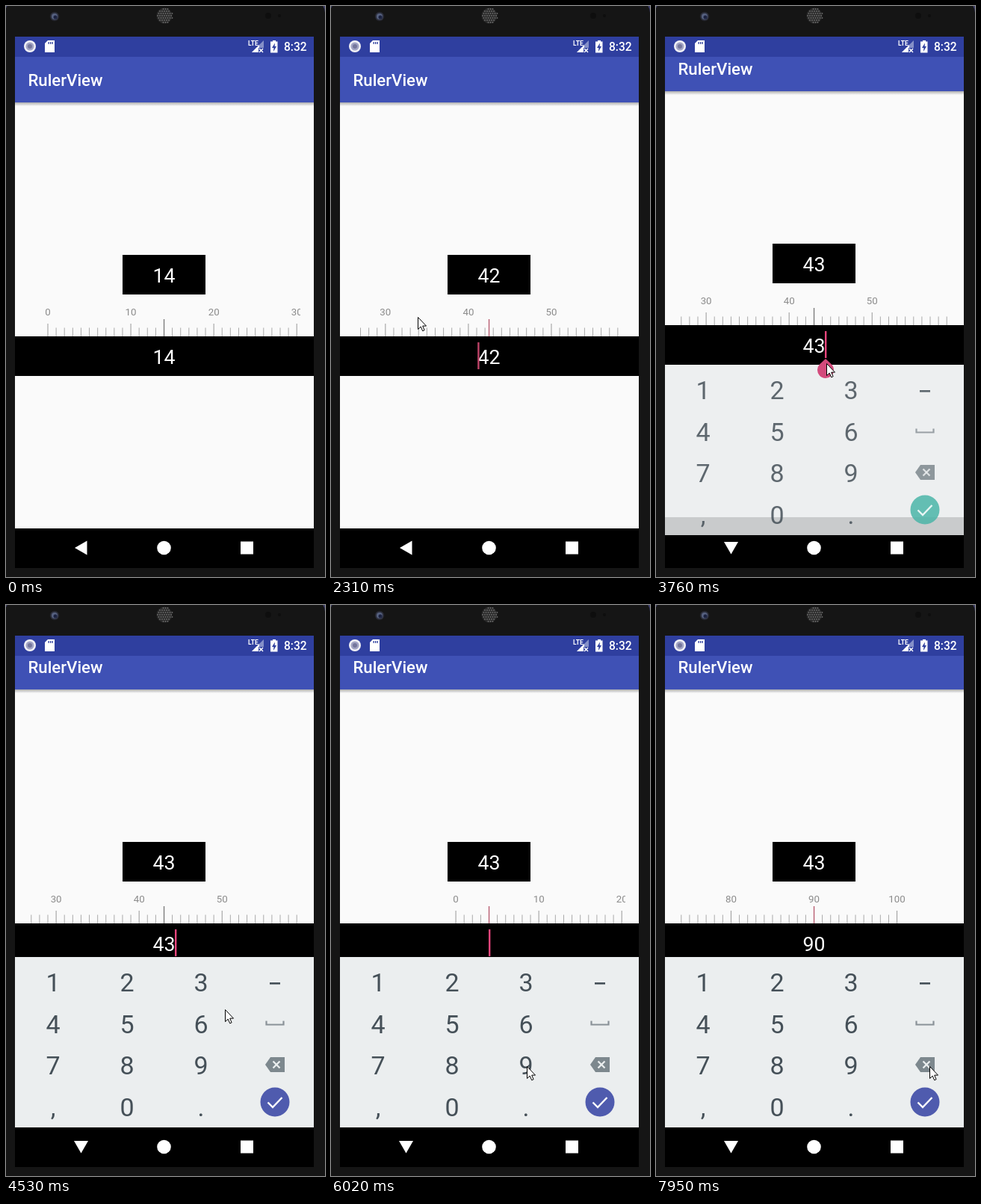
Write an HTML page with a canvas that moves like this. It is 427 px wide and 764 px high and loops after 8000 ms.

```html
<!DOCTYPE html>
<html lang="en">
<head>
<meta charset="utf-8">
<title>RulerView</title>
<style>
html, body { margin: 0; height: 100%; overflow: hidden; background: #151515; }
canvas { display: block; }
</style>
</head>
<body>
<canvas id="stage" width="427" height="764"></canvas>
<script>
const g = document.getElementById('stage').getContext('2d');
const LOOP = 8000, MID = 211.5, UNIT = 11.107;
const INK = '#455058', ROSE = '#b5566b', BEZEL = '#151515', STATUS = '#2f3f9f', KEYS = '#ebeeef';

// the two drags across the ruler
const DRAGS = [{ at: 1290, time: 351, to: 30.5 }, { at: 2150, time: 202, to: 43 }];
// typed edits: the field's new text and the key pressed for it
const EDITS = [
  { at: 5080, time: 255, text: '4', col: 3, row: 2 },
  { at: 5620, time: 100, text: '', col: 3, row: 2 },
  { at: 6280, time: 300, text: '9', col: 2, row: 2 },
  { at: 7110, time: 400, text: '90', col: 1, row: 3 }
];
// the pointer's moves: start, duration, x, y
const MOVES = [
  [200, 470, 272, 468], [910, 230, 283, 423], [1290, 351, 30, 417], [1700, 370, 250, 420],
  [2150, 202, 110, 416], [2400, 450, 230, 468], [3530, 200, 228, 478], [4370, 600, 368, 614],
  [5640, 380, 262, 617], [6400, 400, 160, 665], [7200, 750, 366, 617]
];
// moments at which the caret starts blinking anew
const BLINKS = [450, ...DRAGS.map(d => d.at + 150), 3530, ...EDITS.map(e => e.at)];

function easeOut(t, start, length) {
  const u = Math.min(1, Math.max(0, (t - start) / length));
  return 1 - (1 - u) ** 2;
}

function rulerValue(t) {
  const steps = [...DRAGS, ...EDITS.filter(e => e.text).map(e => ({ ...e, to: +e.text }))];
  return steps.reduce((v, s) => v + (s.to - v) * easeOut(t, s.at, s.time), 14);
}

function pointerAt(t) {
  return MOVES.reduce(([x, y], [at, time, toX, toY]) => {
    const e = easeOut(t, at, time);
    return [x + (toX - x) * e, y + (toY - y) * e];
  }, [274, 720]);
}

const lastBefore = (list, t) => list.filter(v => v <= t).pop();

function rect(x, y, w, h, color) {
  g.fillStyle = color;
  g.fillRect(x, y, w, h);
}

function disc(x, y, r, color) {
  g.fillStyle = color;
  g.beginPath();
  g.arc(x, y, r, 0, 7);
  g.fill();
}

function path(points, close = true) {
  g.beginPath();
  for (let i = 0; i < points.length; i += 2) g.lineTo(points[i], points[i + 1]);
  if (close) g.closePath();
}

function poly(points, color) {
  path(points);
  g.fillStyle = color;
  g.fill();
}

function line(points, color, width) {
  path(points, false);
  g.strokeStyle = color;
  g.lineWidth = width;
  g.stroke();
}

function cross(x, y, r, color, width) {
  line([x - r, y - r, x + r, y + r], color, width);
  line([x + r, y - r, x - r, y + r], color, width);
}

function text(s, x, y, size, color, align = 'center', weight = 400) {
  g.font = `${weight} ${size}px Roboto, sans-serif`;
  g.textAlign = align;
  g.fillStyle = color;
  g.fillText(s, x, y);
}

function clipped(x, y, w, h, draw) {
  g.save();
  g.beginPath();
  g.rect(x, y, w, h);
  g.clip();
  draw();
  g.restore();
}

function bezel() {
  rect(0, 0, 427, 764, '#3d3f6b');
  g.fillStyle = BEZEL;
  g.beginPath();
  g.roundRect(-1, -7, 428, 790, 16);
  g.fill();
  disc(65, 14, 6, '#2c2e3a');
  disc(65, 14, 4, '#56617f');
  disc(66, 15, 2.5, '#1c2340');
  disc(212, 13, 10.5, '#2b2b2b');
  for (let y = -9; y <= 9; y += 3)
    for (let x = -9; x <= 9; x += 3)
      if (x * x + y * y < 95) disc(212 + x + (y % 2 ? 1.5 : 0), 13 + y, 0.9, '#6a6a6a');
  disc(351, 13, 4, '#0e0e0e');
  disc(366, 13, 2, '#0e0e0e');
}

function statusBar() {
  rect(12, 41, 400, 27, STATUS);
  disc(32, 54, 8, '#f1f1f6');
  disc(32, 54, 5.5, '#a3a5c4');
  disc(32, 54, 3, '#74769c');
  poly([56, 46, 65, 46, 65, 62, 52, 62, 52, 50], '#fff');
  for (let x = 56.5; x < 63; x += 2.5) rect(x, 48, 1.3, 3, STATUS);
  poly([345, 46, 345, 62, 329, 62], '#8590c8');
  poly([339, 52, 339, 62, 329, 62], '#fff');
  rect(338, 56, 8, 7, STATUS);
  cross(341.5, 59.5, 2.5, '#fff', 1.4);
  text('LTE', 324, 53, 8.5, '#fff', 'left', 700);
  rect(354, 47.5, 9.5, 15, '#fff');
  rect(357, 46, 4, 2, '#fff');
  poly([360, 49.5, 356, 56, 358.4, 56, 358, 61, 362, 54, 359.6, 54], STATUS);
  text('8:32', 372, 60, 15.6, '#fff', 'left', 500);
}

function ruler(t, value) {
  clipped(29, 395, 365, 47, () => {
    for (let n = 0; n <= 100; n++) {
      const x = MID + (n - value) * UNIT, major = n % 10 === 0;
      if (x < 29 || x > 394) continue;
      rect(x - 0.5, major ? 425 : 430.5, 1, 17, major ? '#999' : '#aaa');
      if (major) text(n, x, 414, 13.3, '#8b8b8b');
    }
    const moved = t > 1290 && t < 3530 || t > 5080;
    rect(MID - 0.6, 419, 1.3, 23, moved ? ROSE : '#777');
  });
}

function page(t) {
  const value = rulerValue(t), shown = Math.round(value);
  const edit = lastBefore(EDITS.map(e => e.at), t);
  const field = edit ? EDITS.find(e => e.at === edit).text : String(shown);
  rect(12, 41, 400, 658, '#fafafa');
  const shade = g.createLinearGradient(0, 129, 0, 134);
  shade.addColorStop(0, 'rgba(0,0,0,.3)');
  shade.addColorStop(1, 'rgba(0,0,0,0)');
  rect(12, 129, 400, 5, shade);
  rect(12, 60, 400, 69, '#3f51b5');
  text('RulerView', 29.5, 107, 22.2, '#fff', 'left', 500);
  rect(156, 333, 111, 53, '#000');
  text(edit ? 43 : shown, MID, 370, 26.7, '#fff');
  ruler(t, value);
  rect(12, 442, 400, 53, '#000');
  text(field, MID, 479, 26.7, '#fff');
  if ((t - lastBefore(BLINKS, t)) % 1000 < 500) {
    const atEnd = t > 3530, half = g.measureText(field).width / 2;
    rect(atEnd ? MID + half - 0.5 : 196.2, 450, 2.4, 36, atEnd ? '#e8457c' : '#bd4368');
  }
}

function keyboard(t) {
  rect(12, 471, 400, 228, KEYS);
  for (const { at, col, row } of EDITS)
    if (t >= at - 130 && t < at) rect(14 + col * 99, 478 + row * 55, 98, 55, '#d8dde0');
  [...'123456789,0.'].forEach((c, i) =>
    text(c, 63 + i % 3 * 99, 517 + Math.floor(i / 3) * 55.5, 34, INK));
  rect(353, 505, 14, 2.6, INK);
  line([348.5, 556.5, 348.5, 561.5, 371.5, 561.5, 371.5, 556.5], '#8a9298', 2.2);
  poly([347, 615, 354, 605, 373, 605, 373, 625, 354, 625], '#7d888e');
  cross(362, 615, 4.5, KEYS, 2.3);
  disc(360, 665, 19.5, t < 3850 ? '#4db6a9' : '#4f5bae');
  line([350.5, 665.5, 357, 672, 369.5, 659], '#fff', 2.4);
}

function handle(y) {
  g.fillStyle = '#d34b7c';
  g.beginPath();
  g.moveTo(227, y);
  g.lineTo(235, y + 7.5);
  g.arc(227, y + 15, 11, -0.75, Math.PI + 0.75);
  g.fill();
}

function navBar(down) {
  poly(down ? [91, 717, 110, 717, 100.5, 733.5] : [92, 725, 108.5, 715.5, 108.5, 734.5], '#fff');
  disc(MID, 725, 9.3, '#fff');
  rect(314, 716.5, 17, 17, '#fff');
}

function pointer(x, y) {
  g.save();
  g.translate(Math.round(x) + 0.5, Math.round(y) + 0.5);
  poly([0, 0, 0, 16, 3.7, 12.6, 6.2, 18.3, 8.6, 17.2, 6.2, 11.6, 11, 11.6], '#fff');
  g.strokeStyle = '#000';
  g.lineWidth = 1;
  g.stroke();
  g.restore();
}

function draw(t) {
  const pan = Math.round(16 * easeOut(t, 3560, 260)), open = easeOut(t, 3600, 260);
  bezel();
  rect(12, 41, 400, 711, '#000');
  clipped(12, 41, 400, 711, () => {
    g.save();
    g.translate(0, -pan);
    page(t);
    g.restore();
    statusBar();
    if (open > 0) {
      g.save();
      g.globalAlpha = open;
      g.translate(0, Math.round(60 * (1 - open)));
      keyboard(t);
      g.restore();
    }
    if (t > 3560 && t < 4300) handle(487 - pan);
    navBar(t > 3600);
  });
  if (t >= 200) pointer(...pointerAt(t));
}

const start = performance.now();
function tick() {
  draw((performance.now() - start) % LOOP);
  requestAnimationFrame(tick);
}
tick();
</script>
</body>
</html>
```
